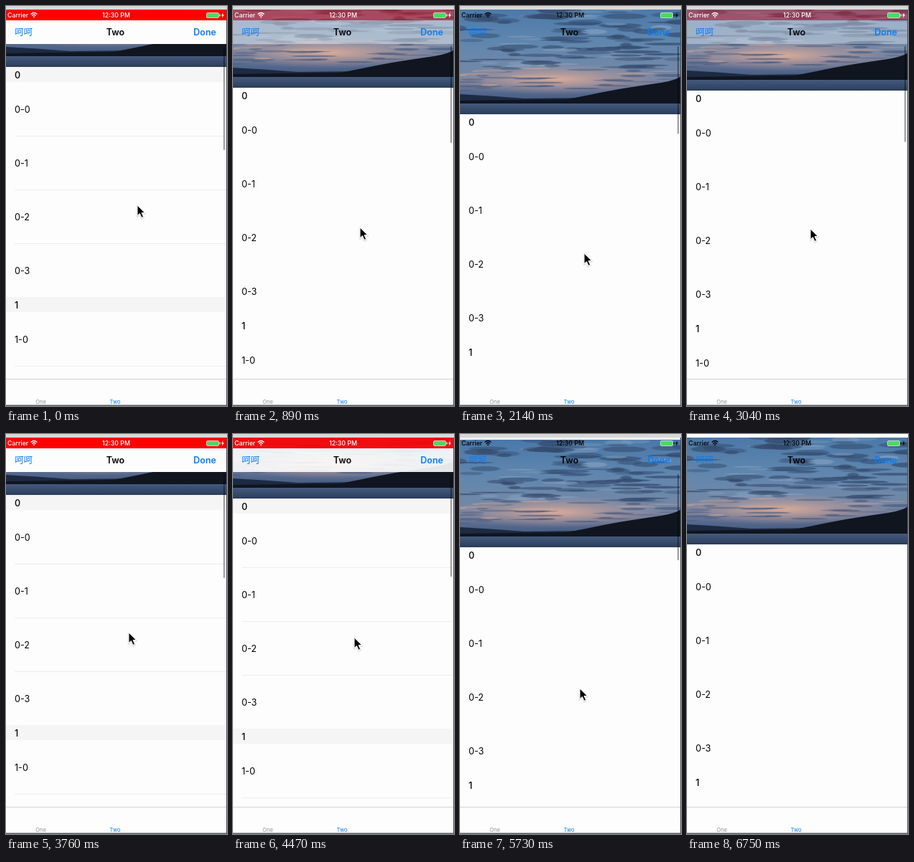
Recreate the animation shown at these times as an HTML page. Size 308 by 558 pixels, loop 6.85 s.

```html
<!DOCTYPE html>
<html lang="en">
<head>
<meta charset="utf-8">
<style>
html, body { margin: 0; width: 100%; height: 100%; overflow: hidden; background: #fdfdfd; }
svg { display: block; width: 308px; height: 558px; font-family: Inter, Roboto, "Noto Sans CJK SC", sans-serif; }
.row { font-size: 12.6px; }
.head { font-size: 12.6px; font-weight: 500; }
.nav { font-size: 12.5px; fill: #0a7cf5; }
.tab { font-size: 7.5px; text-anchor: middle; }
.status { font-size: 8.8px; font-weight: 500; }
</style>
</head>
<body>
<svg viewBox="0 0 308 558">
  <defs>
    <linearGradient id="sky" x2="0" y2="1">
      <stop offset="0" stop-color="#4a78a8"/>
      <stop offset=".35" stop-color="#5f86ae"/>
      <stop offset=".6" stop-color="#6f88a8"/>
      <stop offset=".76" stop-color="#77829f"/>
      <stop offset=".88" stop-color="#53678c"/>
      <stop offset="1" stop-color="#40557a"/>
    </linearGradient>
    <radialGradient id="glow">
      <stop offset="0" stop-color="#dcac98" stop-opacity=".95"/>
      <stop offset="1" stop-color="#c09a98" stop-opacity="0"/>
    </radialGradient>
    <linearGradient id="water" x2="0" y2="1">
      <stop offset="0" stop-color="#45597c"/>
      <stop offset=".5" stop-color="#374c6d"/>
      <stop offset="1" stop-color="#2b3c58"/>
    </linearGradient>
    <filter id="soft" x="-20%" y="-20%" width="140%" height="140%"><feGaussianBlur stdDeviation="1.3 .7"/></filter>
    <clipPath id="screen"><rect y="5" width="308" height="552"/></clipPath>
    <clipPath id="frame"><rect width="308" height="150"/></clipPath>
  </defs>
  <rect width="308" height="558" fill="#fdfdfd"/>
  <g clip-path="url(#screen)">
    <rect y="5" width="308" height="6" fill="#f0f0f0"/>
    <g id="list">
      <g clip-path="url(#frame)" transform="translate(0 -150)">
        <rect width="308" height="137" fill="url(#sky)"/>
        <ellipse cx="135" cy="101" rx="150" ry="22" fill="url(#glow)"/>
        <g id="clouds" filter="url(#soft)"/>
        <path d="M0 122Q40 124 90 128L180 127V137H0Z" fill="#1c2a43"/>
        <path d="M0 131L150 129Q176 124 200 119Q220 115 240 112T280 106T308 97V136H0Z" fill="#10151f"/>
        <rect y="135" width="308" height="15" fill="url(#water)"/>
      </g>
      <g id="rows"></g>
    </g>
    <rect id="bar" x="303" y="56" width="2" rx="1" fill="#000" opacity=".38"/>
    <g id="tint">
      <rect y="5" width="308" height="15" fill="#f00"/>
      <rect y="20" width="308" height="33" fill="#fdfdfd"/>
    </g>
    <g id="status" class="status">
      <text x="2" y="16">Carrier</text>
      <text x="153.500" y="16" text-anchor="middle">12:30 PM</text>
      <path d="M34.500 11.500Q39 7.500 43.500 11.500M36.300 13.500Q39 11 41.700 13.500" fill="none" stroke="currentColor" stroke-width="1.3"/>
      <path d="M37.500 14.800Q39 13.500 40.500 14.800L39 16.500Z"/>
      <rect x="279.500" y="9.500" width="17" height="7" rx="1.500" fill="#4cd964" stroke="#d5eadb" stroke-width=".8"/>
      <path d="M297.500 11.500h1.200v3h-1.200ZM302.500 9L300 13.500h1.700L300.800 17L304 12.300h-1.800Z"/>
    </g>
    <text class="nav" x="12" y="41">呵呵</text>
    <text class="nav" x="152.500" y="41" text-anchor="middle" font-weight="600" style="fill:#000">Two</text>
    <text class="nav" x="293" y="41" text-anchor="end" font-weight="600">Done</text>
    <rect y="520" width="308" height="36" fill="#fdfdfd"/>
    <rect id="rule" y="520" width="308" height="1" fill="#d2d2d2"/>
    <text class="tab" x="48.500" y="555" fill="#929292">One</text>
    <text class="tab" x="152" y="555" fill="#0a7cf5">Two</text>
  </g>
  <rect id="top" width="308" height="5"/>
  <rect y="556.500" width="308" height="1.500" fill="#555a60"/>
  <rect x="307" y="5" width="1" height="553" fill="#4b5260"/>
  <g id="cursor">
    <path d="M0 0V14.500L3.400 11.500L6 17.300L8.600 16.200L6 10.500H10.600Z" fill="#aaa" stroke="#bbb" stroke-width="3" stroke-linejoin="round" opacity=".35" transform="translate(0 1)"/>
    <path d="M0 0V14.500L3.400 11.500L6 17.300L8.600 16.200L6 10.500H10.600Z" stroke="#fff" stroke-width="1"/>
  </g>
</svg>
<script>
const $ = id => document.getElementById(id);
const LOOP = 6850, STEP = 179;

// Each run: start time, then points of [step, list top, cursor x, cursor y]
const runs = [
  [350, [0, 85, 183, 278], [7, 135, 173, 332], [11, 151, 173, 345]],
  [2500, [0, 151, 173, 345], [8, 85, 171, 277], [10, 80, 170, 272]],
  [4470, [0, 80, 170, 272], [4, 121, 167, 320], [8, 158, 167, 355]],
  [6080, [0, 158, 167, 355], [3, 154, 150, 556]]
];

function add(parent, tag, attrs, text = "") {
  const el = document.createElementNS("http://www.w3.org/2000/svg", tag);
  for (const k in attrs) el.setAttribute(k, attrs[k]);
  el.textContent = text;
  parent.append(el);
}

function buildRows() {
  for (let s = 0; s < 2; s++) {
    const y = s * 321;
    add($("rows"), "rect", { class: "shade", y, width: 308, height: 21, fill: "#f5f5f5" });
    add($("rows"), "text", { class: "head", x: 12, y: y + 16 }, s);
    for (let r = 0; r < 4; r++) {
      const ry = y + 21 + r * 75;
      add($("rows"), "text", { class: "row", x: 12, y: ry + 42.5 }, `${s}-${r}`);
      if (r < 3) add($("rows"), "rect", { class: "shade", x: 12, y: ry + 75, width: 296, height: 1, fill: "#ececec" });
    }
  }
}

// Clouds get thinner and paler towards the horizon
function buildClouds() {
  let seed = 11;
  const rnd = () => (seed = seed * 16807 % 2147483647) / 2147483647;
  for (let i = 0; i < 150; i++) {
    const cy = rnd() * 120, depth = 1 - cy / 135;
    const dark = cy > 85 ? "#4a5c7e" : "#33496c";
    const light = cy > 85 ? "#c9a49a" : "#84a0bf";
    add($("clouds"), "ellipse", {
      cx: rnd() * 320 - 6, cy, rx: 8 + rnd() * 26, ry: 0.8 + rnd() * 4.2 * depth,
      fill: i % 5 ? dark : light,
      opacity: 0.35 + rnd() * 0.4
    });
  }
}

function pose(t) {
  const [start, ...pts] = runs.filter(r => t >= r[0]).pop() || runs[0];
  const last = pts[pts.length - 1];
  const k = t < start ? 0 : Math.min(last[0], Math.floor((t - start + 6) / STEP) + 1);
  const i = Math.max(1, pts.findIndex(p => p[0] >= k));
  const a = pts[i - 1], b = pts[i], f = (k - a[0]) / (b[0] - a[0]);
  return a.slice(1).map((v, j) => v + (b[j + 1] - v) * f);
}

function draw(t) {
  const [top, x, y] = pose(t).map(Math.round);
  const ended = t >= 6750;
  const ink = top >= 150 ? "#000" : "#fff";
  $("list").setAttribute("transform", `translate(0 ${top})`);
  $("tint").setAttribute("opacity", Math.max(0, Math.min(1, (137 - top) / 52)));
  $("status").setAttribute("fill", ink);
  $("status").setAttribute("color", ink);
  $("bar").setAttribute("height", 145 - (top - 85) * 0.34);
  $("bar").style.display = $("cursor").style.display = ended ? "none" : "";
  $("cursor").setAttribute("transform", `translate(${x} ${y})`);
  $("top").setAttribute("fill", ended ? "#fff" : "#d8d8d8");
  $("rule").style.display = t >= 2140 && t < 2500 ? "none" : "";
  for (const el of shades) el.style.display = top < 100 ? "" : "none";
}

buildRows();
buildClouds();
const shades = document.querySelectorAll(".shade");
const begin = performance.now();
function tick() {
  draw((performance.now() - begin) % LOOP);
  requestAnimationFrame(tick);
}
tick();
</script>
</body>
</html>
```
